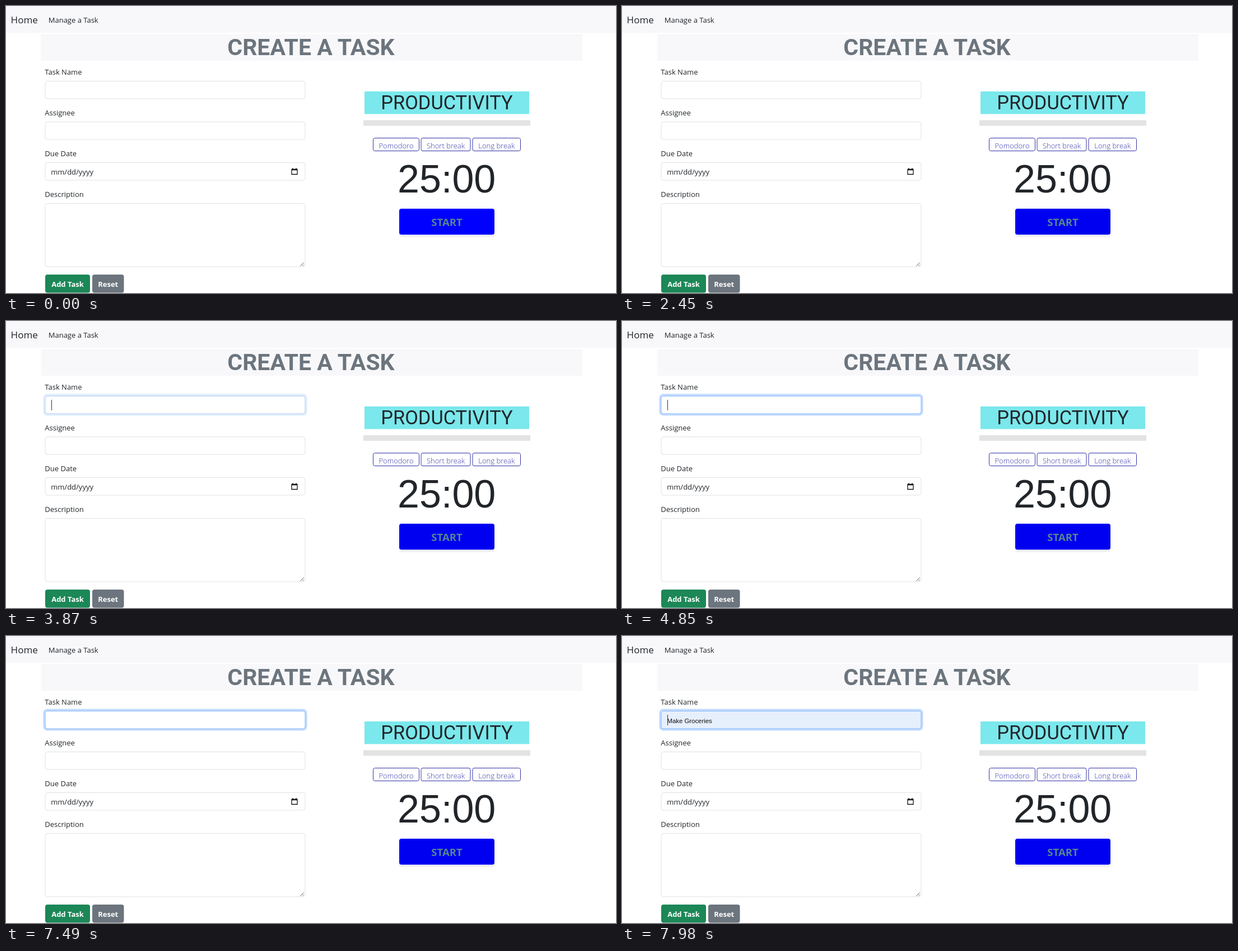
These frames come from a looping animation (1089x514 px, 8000 ms). An HTML page:

```html
<!DOCTYPE html>
<html lang="en">
<head>
<meta charset="utf-8">
<title>Create a task</title>
<style>
  html, body { margin: 0; width: 100%; height: 100%; overflow: hidden; background: #fff; }
  svg { display: block; width: 100%; height: 100%; }
  text { font: 13px "Open Sans", "Noto Sans", sans-serif; fill: #212529; white-space: pre; }
  .mid { text-anchor: middle; }
  .bar { fill: #f8f8fb; }
  .field { fill: #fff; stroke: #dee2e6; }
  .brand { font-size: 17px; }
  .title { font: bold 41px Roboto, sans-serif; fill: #6c757d; }
  .banner { font: 34.4px Roboto, sans-serif; }
  .clock { font: 70px "Liberation Sans", Arial, sans-serif; }
  .mode { font-weight: 300; fill: #3a3aae; }
  .pill { fill: #fff; stroke: #3030a8; }
  .btn { font-weight: bold; fill: #fff; }
  .start { font-size: 18.6px; font-weight: bold; fill: #56858f; }
  .fill { font: 11.4px "Liberation Sans", Arial, sans-serif; fill: #111; }
</style>
</head>
<body>
<svg id="stage" viewBox="0 0 1089 514" xmlns="http://www.w3.org/2000/svg"></svg>
<script>
const stage = document.getElementById('stage');

function add(tag, attrs, content) {
  const el = document.createElementNS(stage.namespaceURI, tag);
  for (const key in attrs) el.setAttribute(key, attrs[key]);
  if (content) el.textContent = content;
  stage.appendChild(el);
  return el;
}
const box = (x, y, width, height, attrs) => add('rect', { x, y, width, height, ...attrs });
const label = (x, y, content, cls = '') => add('text', { x, y, class: cls }, content);
const field = (y, height) => box(70, y, 464, height, { rx: 4, class: 'field' });

// Header
box(0, 0, 1089, 48, { class: 'bar' });
label(8.6, 31, 'Home', 'brand');
label(75.7, 29.7, 'Manage a Task');
const strip = box(63, 50, 966, 48, { class: 'bar' });
label(544.5, 88.3, 'CREATE A TASK', 'title mid');

// Form
['Task Name', 'Assignee', 'Due Date', 'Description'].forEach((name, i) => label(69.3, 122.7 + i * 73.2, name));
const ring = box(68.2, 132.2, 467.6, 35.6, { rx: 5.5, fill: 'none', stroke: '#c2dbfe', 'stroke-width': 3.6 });
const nameField = field(134.5, 31.5);
field(207.5, 31.5);
field(280.5, 31.5);
field(353.5, 113.5);
label(80.2, 302.3, 'mm/dd/yyyy');
add('path', { d: 'M510 292.5h10v9h-10zM510 293.5h10M512 290v2M518 290v2', fill: 'none', stroke: '#111', 'stroke-width': 1.3 });
add('path', { d: 'M525.5 465.5l6-6M529.5 465.5l2-2', fill: 'none', stroke: '#555' });
box(70, 481, 80, 32.5, { rx: 4, fill: '#1c8757' });
box(154, 481, 56.5, 32.5, { rx: 4, fill: '#6c757d' });
label(110, 503, 'Add Task', 'btn mid');
label(182.2, 503, 'Reset', 'btn mid');
const typed = label(80.4, 156, 'Make Groceries', 'fill');
const caret = box(81, 141, 1, 19, { fill: '#333' });

// Timer
box(640, 153, 294, 40.5, { fill: '#7ae8ec' });
label(787, 185.3, 'PRODUCTIVITY', 'banner mid');
box(638, 204.5, 298, 10, { fill: '#e3e3e3' });
[[655.5, 82, 'Pomodoro'], [741, 88, 'Short break'], [833, 85.5, 'Long break']].forEach(([x, w, name]) => {
  box(x, 236.5, w, 23, { rx: 3, class: 'pill' });
  label(x + w / 2, 255, name, 'mode mid');
});
label(786.7, 333.5, '25:00', 'clock mid');
box(702, 368, 170, 46, { rx: 4, fill: '#f0f0f3' });
const startButton = box(702, 363, 170, 46.5, { rx: 4 });
label(787, 393.7, 'START', 'start mid');

const pointer = add('path', {
  d: 'M.5.5V12.6L3.3 10.1L5.3 14.6L7.2 13.8L5.3 9.4H9.2Z',
  fill: '#fff', stroke: '#55555f', 'stroke-width': .8
});

// Pointer visits: [from, to, step length, last step, path points as [step, x, y]]
const visits = [
  [250, 2450, 77, 3, [[0, 695, 280], [3, 735, -3]]],
  [2870, 3560, 77, 8, [[0, 244, 17], [5, 220, 94], [8, 218, 132]]]
];

function pointerAt(t) {
  const visit = visits.find(([from, to]) => t >= from && t < to);
  if (!visit) return null;
  const [from, , length, last, points] = visit;
  const step = Math.min(last, Math.floor((t - from) / length));
  const i = Math.max(1, points.findIndex(p => p[0] >= step));
  const a = points[i - 1], b = points[i];
  const k = (step - a[0]) / (b[0] - a[0]);
  return [a[1] + (b[1] - a[1]) * k, a[2] + (b[2] - a[2]) * k];
}

const blinks = [3800, 4280, 4850, 5350, 5850, 6430, 6920, 7490, 7980];
const show = (el, on) => el.setAttribute('visibility', on ? 'visible' : 'hidden');

function draw(t) {
  strip.setAttribute('x', t < 80 ? 62 : 63);
  strip.setAttribute('width', t < 80 ? 967 : 966);
  startButton.setAttribute('fill', t < 80 ? '#0000ff' : '#0000f0');

  const focus = t < 3800 ? 0 : t < 3870 ? .1 : t < 3960 ? .5 : 1;
  const mix = (a, b) => Math.round(a + (b - a) * focus);
  ring.setAttribute('opacity', focus);
  nameField.style.stroke = `rgb(${mix(222, 134)},${mix(226, 183)},${mix(230, 254)})`;

  const filled = t >= 7560;
  nameField.style.fill = filled ? '#e6effc' : '#fff';
  show(typed, filled);
  show(caret, blinks.filter(b => t >= b).length % 2);

  const pos = pointerAt(t);
  show(pointer, pos);
  if (pos) pointer.setAttribute('transform', `translate(${pos[0]} ${pos[1]})`);
}

const began = performance.now();
function tick() {
  draw((performance.now() - began) % 8000);
  requestAnimationFrame(tick);
}
tick();
</script>
</body>
</html>
```
